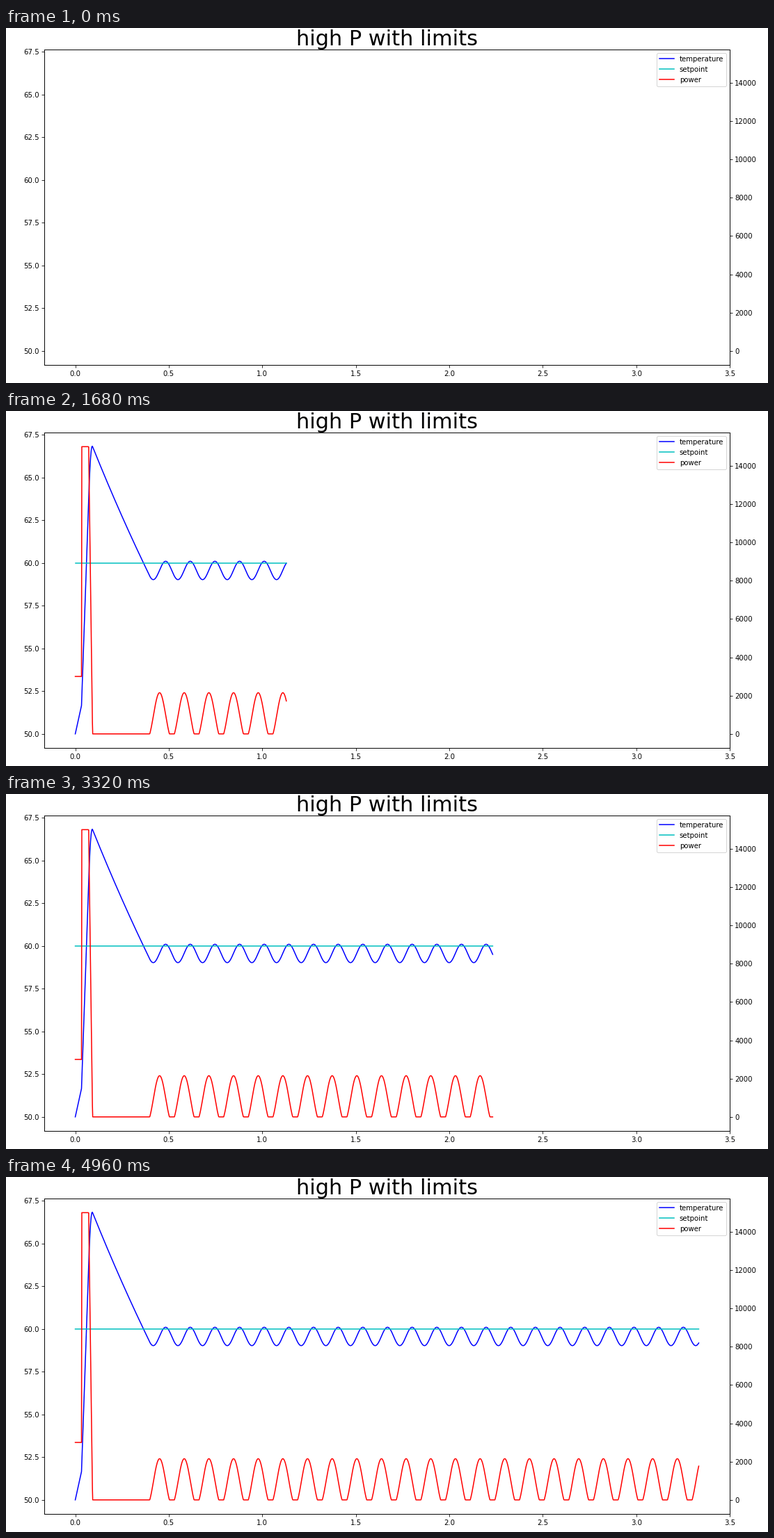
Recreate the animation shown at these times as a matplotlib script. Size 1095 by 511 pixels, loop 5000 ms.

```python
import numpy as np
import matplotlib.pyplot as plt
from matplotlib.animation import FuncAnimation

FRAMES = 125
DURATION = 200.0  # simulated seconds
SETPOINT = 60.0
DELAY = 2.0  # seconds before the controller reacts
MAX_POWER = 15000
RAMP_START, RAMP_END = 4.298, 5.549  # power falls from its limit to zero
CYCLE_START, PERIOD = 23.877, 7.909  # steady oscillation
AMBIENT, COOLING = 24.0, 0.01061
HEATING, END_SLOPE = 5.28, -0.45  # degrees per second


def wave(t, mean, amplitude, peak):
    return mean + amplitude * np.cos(2 * np.pi * (t - peak) / PERIOD)


def temperature(t):
    start_slope = 0.83
    switch_temp = 50 + start_slope * DELAY
    ramp_temp = switch_temp + HEATING * (RAMP_START - DELAY)
    bend = (END_SLOPE - HEATING) / (RAMP_END - RAMP_START)

    def ramp(s):
        return ramp_temp + HEATING * s + bend * s**2 / 2

    top = ramp(RAMP_END - RAMP_START)
    cooling = AMBIENT + (top - AMBIENT) * np.exp(-COOLING * (t - RAMP_END))
    return np.select(
        [t <= DELAY, t <= RAMP_START, t <= RAMP_END, t <= CYCLE_START],
        [50 + start_slope * t,
         switch_temp + HEATING * (t - DELAY),
         ramp(t - RAMP_START),
         cooling],
        wave(t, 59.565, 0.537, 28.978))


def power(t):
    ramp = MAX_POWER * (RAMP_END - t) / (RAMP_END - RAMP_START)
    cycle = np.maximum(0, wave(t, 960, 1190, 27.047))
    return np.select(
        [t <= DELAY + 0.01, t <= RAMP_END, t <= CYCLE_START - 0.5],
        [3000, np.clip(ramp, 0, MAX_POWER), 0],
        cycle)


seconds = np.linspace(0, DURATION, 2001)
minutes = seconds / 60
curves = [temperature(seconds),
          np.full_like(seconds, SETPOINT),
          power(seconds)]

fig, ax = plt.subplots(figsize=(15, 7), dpi=73)
fig.subplots_adjust(left=0.05, right=0.95, bottom=0.05, top=0.94)
power_ax = ax.twinx()

lines = [ax.plot([], [], "b", label="temperature")[0],
         ax.plot([], [], "c", label="setpoint")[0],
         power_ax.plot([], [], "r", label="power")[0]]

temp_margin = 0.05 * 16.81
ax.set_xlim(-1 / 6, 3.5)
ax.set_ylim(50 - temp_margin, 66.81 + temp_margin)
power_ax.set_ylim(-0.05 * MAX_POWER, 1.05 * MAX_POWER)
ax.set_title("high P with limits", fontsize=30)
power_ax.legend(handles=lines, loc="upper right")


def update(frame):
    end = DURATION * frame / (FRAMES - 1)
    count = int(round(end * 10)) + 1 if frame else 0
    for line, values in zip(lines, curves):
        line.set_data(minutes[:count], values[:count])
    return lines


anim = FuncAnimation(fig, update, frames=FRAMES, interval=40,
                     init_func=lambda: update(0), repeat=True)
plt.show()
```
